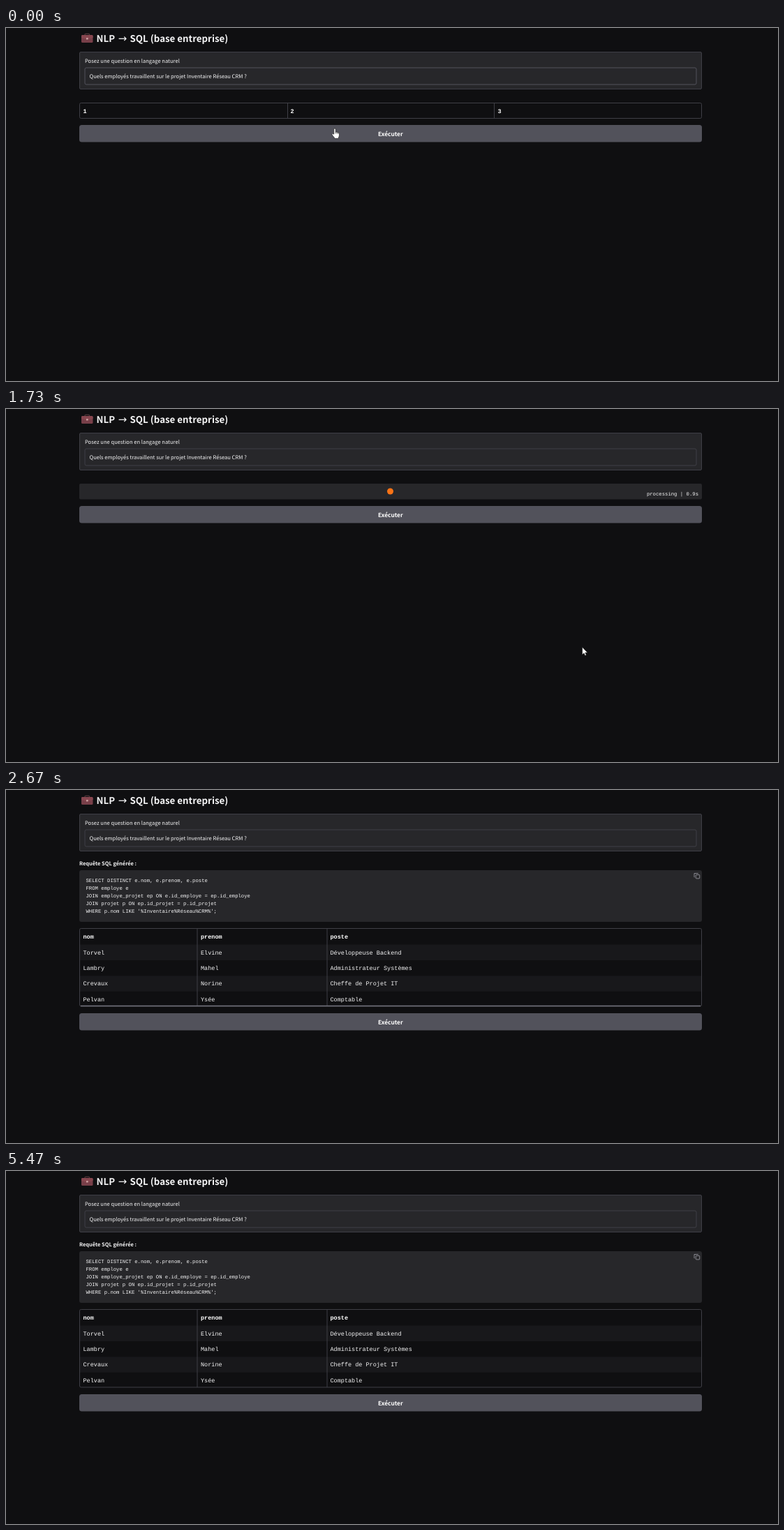
An HTML page that plays this animation: 1106 by 506 pixels, repeating every 6.74 s.

```html
<!DOCTYPE html>
<html lang="fr">
<head>
<meta charset="utf-8">
<title>NLP → SQL</title>
<style>
  html, body { margin: 0; width: 100%; height: 100%; overflow: hidden; background: #0f0f11; }
  svg { display: block; width: 100%; height: 100%; }
  text {
    font: 7.6px "Noto Sans CJK JP", "Noto Sans CJK SC", "Noto Sans CJK", "Open Sans", sans-serif;
    fill: #f4f4f5; white-space: pre; text-rendering: geometricPrecision;
  }
  .title { font-size: 13.3px; font-weight: 600; }
  .title.arrow { font: 15px "DejaVu Sans", sans-serif; }
  .heading { font-size: 7.45px; font-weight: 600; }
  .action { font-size: 8.35px; font-weight: 600; text-anchor: middle; fill: #fff; }
  .code, .cell, .head { font-family: "Liberation Mono", monospace; }
  .code { font-size: 7.28px; }
  .cell, .head { font-size: 8.5px; }
  .head { font-weight: 700; fill: #fff; }
  .panel { fill: #27272a; }
  .line { fill: none; stroke: #3f3f46; }
</style>
</head>
<body>
<svg viewBox="0 0 1106 506">
  <defs>
    <clipPath id="tableClip"><rect id="tableArea" x="105" y="198" width="892"/></clipPath>
  </defs>

  <g id="briefcase">
    <path d="M113 11V9.2Q113 8.3 114 8.3H118.500Q119.500 8.300 119.500 9.200V11" fill="none" stroke="#50353a" stroke-width="1.300"/>
    <rect x="108" y="10" width="16.500" height="11" rx="1.500" fill="#783f49"/>
    <path d="M108 11.500Q108 10 109.500 10H123Q124.500 10 124.500 11.500V14L116.200 16.500 108 14Z" fill="#87464f"/>
    <rect x="115" y="14" width="2.600" height="2.600" rx=".5" fill="#c9a0a0"/>
  </g>
  <text class="title" x="129.500" y="19.500">NLP</text>
  <text class="title arrow" x="160.800" y="19.500">→</text>
  <text class="title" x="177.500" y="19.500">SQL (base entreprise)</text>

  <rect class="panel" x="105.500" y="34.500" width="891" height="53" rx="1.500" stroke="#3f3f46"/>
  <text x="113" y="49.800">Posez une question en langage naturel</text>
  <rect id="field" class="line" x="113" y="57" width="876" height="24" rx="2"/>
  <text id="question" x="119.500" y="71.600">Quels employés travaillent sur le projet Inventaire Réseau CRM ?</text>
  <rect id="caret" y="63.500" width=".8" height="11" fill="#f4f4f5"/>

  <g id="empty">
    <path class="line" d="M403.500 108V129M699.500 108V129"/>
    <rect class="line" x="105.500" y="107.500" width="891" height="22" rx="2"/>
    <text class="head" x="110.500" y="121.700">1</text>
    <text class="head" x="407.500" y="121.700">2</text>
    <text class="head" x="704.500" y="121.700">3</text>
  </g>

  <g id="busy">
    <rect class="panel" x="105" y="107" width="892" height="22.500" rx="2"/>
    <circle cx="550.500" cy="118" r="4.500" fill="#f97316"/>
    <text id="timer" class="code" x="992" y="124" text-anchor="end"></text>
  </g>

  <g id="result">
    <text class="heading" x="105" y="107.800">Requête SQL générée :</text>
    <rect class="panel" x="105" y="115" width="892" height="74" rx="3"/>
    <g id="query"></g>
    <g fill="none" stroke="#a1a1aa" stroke-width=".8">
      <rect x="988.300" y="121.500" width="5.400" height="5.400" rx=".8"/>
      <path d="M986.500 125H986V119.500H991.500V120"/>
    </g>
    <g clip-path="url(#tableClip)">
      <rect x="106" y="221.500" width="890" height="22.500" fill="#18181b"/>
      <rect x="106" y="266.300" width="890" height="22.500" fill="#18181b"/>
      <g id="rows"></g>
      <path class="line" d="M274 199V310M460 199V310"/>
    </g>
    <rect id="tableFrame" class="line" x="105.500" y="198.500" width="891" rx="2"/>
    <path id="scrollbar" d="M107 309.500H995" stroke="#71717a" stroke-width="1.300"/>
  </g>

  <g id="button">
    <rect x="105" width="892" height="24.500" rx="3.500" fill="#52525b"/>
    <rect id="hover" x="105" width="892" height="24.500" rx="3.500" fill="#3f3f46"/>
    <text class="action" x="550.800" y="15.800">Exécuter</text>
  </g>

  <g id="pointer" fill="#fff" stroke="#111" stroke-width=".6" stroke-linejoin="round">
    <path id="arrow" d="M0 0V11L2.500 8.600 4 12.300 5.800 11.500 4.300 8H7.600Z"/>
    <g id="hand">
      <path d="M-1.200 8.200V1.200A1.200 1.200 0 0 1 1.200 1.200V5.200Q2.600 4.600 3.200 5.600 4.600 5 5 6.200 6.400 5.800 6.400 7.400V10Q6.400 11.500 5.400 12.600V14.300H-.6V13Q-3 10.500 -4 8.600 -3.600 6.600 -1.200 8.200Z"/>
      <path d="M1.200 5.200V7.500M3.200 5.600V7.700M5 6.200V8" fill="none"/>
    </g>
  </g>
</svg>

<script>
const DURATION = 6740, FRAME = 1000 / 15;
const CLICKED = 800, ANSWERED = 2595, EXPANDED = 2660;

const query = [
  "SELECT DISTINCT e.nom, e.prenom, e.poste",
  "FROM employe e",
  "JOIN employe_projet ep ON e.id_employe = ep.id_employe",
  "JOIN projet p ON ep.id_projet = p.id_projet",
  "WHERE p.nom LIKE '%Inventaire%Réseau%CRM%';"
];
const rows = [
  ["nom", "prenom", "poste"],
  ["Torvel", "Elvine", "Développeuse Backend"],
  ["Lambry", "Mahel", "Administrateur Systèmes"],
  ["Crevaux", "Norine", "Cheffe de Projet IT"],
  ["Pelvan", "Ysée", "Comptable"]
];
const columns = [110.5, 279, 464.5];

// Pointer paths: time, x, y of the tip.
const paths = [
  [[0, 471, 144], [600, 562, 159], [800, 562, 159], [1133, 544, 155.5], [1200, 550, 164],
   [1470, 650, 307], [1800, 870, 350], [2130, 1106, 350]],
  [[4330, 1022.5, 418.5], [4870, 480, 506]]
];

const el = id => document.getElementById(id);
const show = (id, on) => el(id).setAttribute("visibility", on ? "inherit" : "hidden");
const set = (id, name, value) => el(id).setAttribute(name, value);
const clamp = v => Math.min(1, Math.max(0, v));

function addText(parent, className, x, y, content) {
  const node = document.createElementNS("http://www.w3.org/2000/svg", "text");
  node.setAttribute("class", className);
  node.setAttribute("x", x);
  node.setAttribute("y", y);
  node.textContent = content;
  el(parent).append(node);
}
query.forEach((line, i) => addText("query", "code", 114.5, 132 + i * 10.9, line));
rows.forEach((row, r) => row.forEach((value, c) =>
  addText("rows", r ? "cell" : "head", columns[c], 213.2 + r * 22.4, value)));

function positionAt(path, t) {
  const i = path.findIndex(point => point[0] > t);
  if (i < 1) return null;
  const [t0, x0, y0] = path[i - 1], [t1, x1, y1] = path[i];
  const k = (t - t0) / (t1 - t0);
  return [x0 + (x1 - x0) * k, y0 + (y1 - y0) * k];
}

function drawPointer(t) {
  const position = positionAt(paths[0], t) || positionAt(paths[1], t);
  show("pointer", position);
  if (!position) return;
  const overButton = position[1] < 163.5;
  show("hand", overButton);
  show("arrow", !overButton);
  set("pointer", "transform", `translate(${position})`);
}

function draw(t) {
  const answered = t >= ANSWERED, expanded = t >= EXPANDED;
  const bottom = expanded ? 310 : 251;

  set("field", "style", `stroke: ${t < CLICKED - 5 ? "#52525b" : "#3f3f46"}`);
  set("caret", "x", 120 + el("question").getComputedTextLength());
  show("caret", t > 330 && t < CLICKED - 5);

  show("empty", t < CLICKED - 5);
  show("busy", t >= CLICKED - 5 && !answered);
  el("timer").textContent = `processing | ${Math.max(0, (t - 830) / 1050).toFixed(1)}s`;

  show("result", answered);
  set("result", "opacity", expanded ? 1 : 0.85);
  set("tableArea", "height", bottom - 198);
  set("tableFrame", "height", bottom - 198.5);
  set("scrollbar", "opacity", expanded ? clamp((5467 - t) / 120) : 0);

  set("button", "transform", `translate(0 ${expanded ? 320 : answered ? 261 : 139})`);
  set("hover", "opacity", Math.min(clamp((t - 60) / 200), clamp((1430 - t) / 200)));
  drawPointer(t);
}

const start = performance.now();
function tick() {
  const t = (performance.now() - start) % DURATION;
  draw(Math.floor((t + 5) / FRAME) * FRAME);
  requestAnimationFrame(tick);
}
tick();
</script>
</body>
</html>
```
